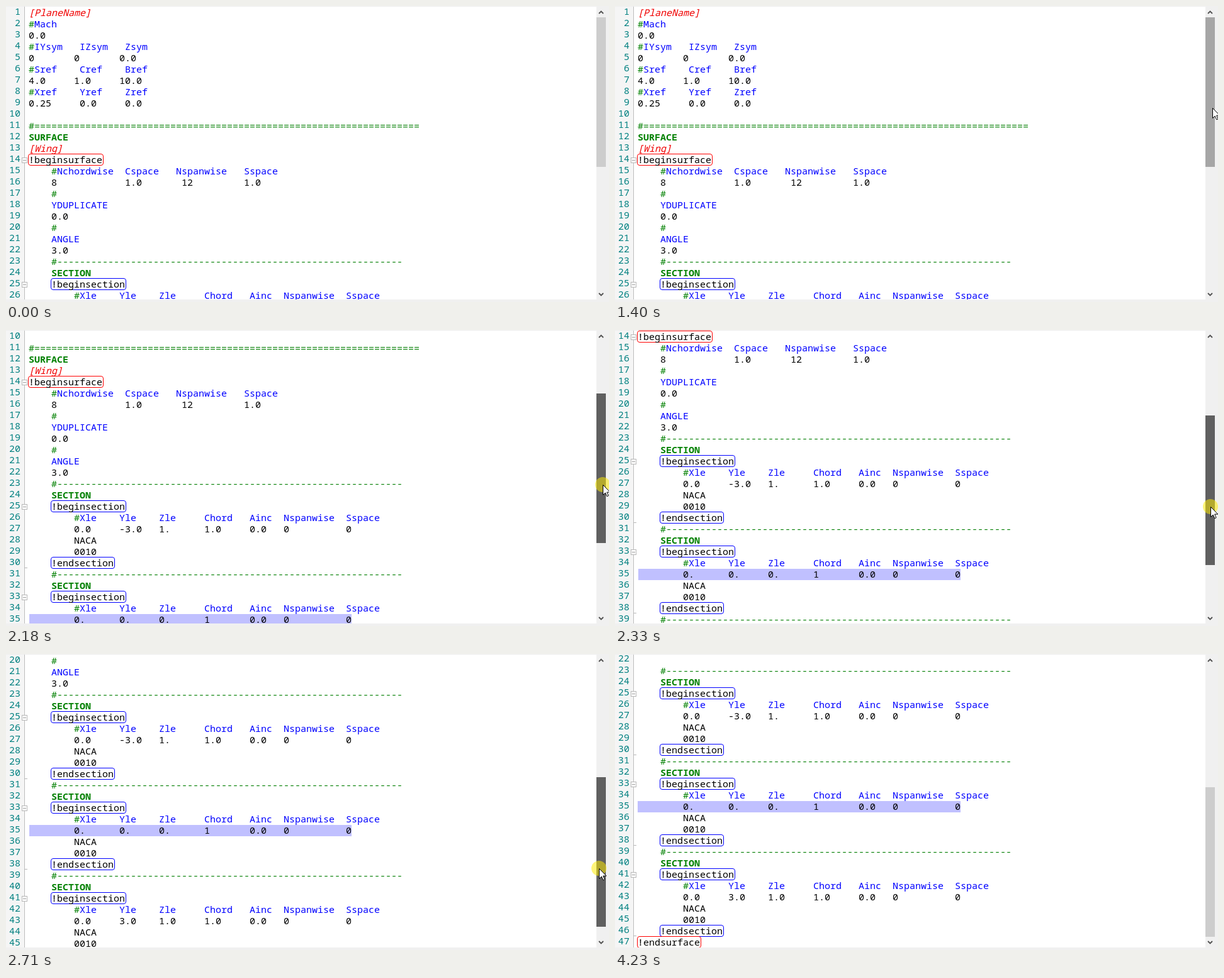
An HTML page with a canvas for the animation above (4.3 s loop, 958 by 471 pixels).

```html
<!DOCTYPE html>
<html lang="en">
<head>
<meta charset="utf-8">
<title>Scrolling through an input file</title>
<style>
html, body { margin: 0; width: 958px; height: 471px; overflow: hidden; background: #fff; }
canvas { display: block; }
</style>
</head>
<body>
<canvas id="stage" width="958" height="471"></canvas>
<script>
const ctx = document.getElementById('stage').getContext('2d');
const LOOP = 4300, ROW = 18, CHAR = 9, LEFT = 36, BOTTOM = 467;
const THUMB_TOP = 18, THUMB_H = 238, TRAVEL = 194, MAX_SCROLL = 380, GRAB = 145;
const FONT = '15px "Noto Sans Mono", "DejaVu Sans Mono", monospace';
const GREEN = '#008000', BLUE = '#0000ff', RED = '#f00000';

const section = values => [
  '    #' + '-'.repeat(61),
  '    SECTION',
  '    !beginsection',
  '        #Xle    Yle    Zle     Chord   Ainc  Nspanwise  Sspace',
  '        ' + values,
  '        NACA',
  '        0010',
  '    !endsection'
];

const lines = [
  '[PlaneName]',
  '#Mach',
  '0.0',
  '#IYsym   IZsym   Zsym',
  '0       0       0.0',
  '#Sref    Cref    Bref',
  '4.0     1.0     10.0',
  '#Xref    Yref    Zref',
  '0.25     0.0     0.0',
  '',
  '#' + '='.repeat(67),
  'SURFACE',
  '[Wing]',
  '!beginsurface',
  '    #Nchordwise  Cspace   Nspanwise   Sspace',
  '    8            1.0       12         1.0',
  '    #',
  '    YDUPLICATE',
  '    0.0',
  '    #',
  '    ANGLE',
  '    3.0',
  ...section('0.0     -3.0   1.      1.0     0.0   0          0'),
  ...section('0.      0.     0.      1       0.0   0          0'),
  ...section('0.0     3.0    1.0     1.0     0.0   0          0'),
  '!endsurface'
];
lines[10] += '=';
const SELECTED = 34;

// Screen updates come in bursts: first time, last time, count
const bursts = [
  [550, 990, 7], [1080, 1400, 5], [1730, 2180, 7],
  [2260, 2710, 7], [2790, 3280, 7], [3350, 3520, 3]
];
// Pointer path: time, x, y
const path = [
  [550, 896, 441], [990, 913, 167], [1400, 949, 162], [1730, 949, 163],
  [1955, 951, 196], [2335, 946, 281], [2560, 942, 319], [3117, 943, 400],
  [3198, 943, 403], [3280, 943, 425], [3435, 944, 455], [3520, 944, 471]
];

function lastUpdate(t) {
  let last = 0;
  for (const [from, to, n] of bursts) {
    const step = (to - from) / (n - 1);
    if (t + 8 >= from) last = from + step * Math.min(n - 1, Math.floor((t + 8 - from) / step));
  }
  return last;
}

function pointerAt(t) {
  const i = path.findIndex(p => p[0] >= t);
  if (i <= 0) return { x: path[0][1], y: path[0][2] };
  const [t0, x0, y0] = path[i - 1], [t1, x1, y1] = path[i];
  const k = (t - t0) / (t1 - t0);
  return { x: Math.round(x0 + (x1 - x0) * k), y: Math.round(y0 + (y1 - y0) * k) };
}

function rect(color, x, y, w, h) {
  ctx.fillStyle = color;
  ctx.fillRect(x, y, w, h);
}

function text(str, x, y, color, style = '') {
  ctx.font = style + ' ' + FONT;
  ctx.fillStyle = color;
  ctx.fillText(str, x, y);
}

function polyline(points, color, width) {
  ctx.beginPath();
  points.forEach(([x, y]) => ctx.lineTo(x, y));
  ctx.strokeStyle = color;
  ctx.lineWidth = width;
  ctx.stroke();
}

function drawCode(line, y) {
  const word = line.trim(), x = LEFT + CHAR * line.search(/\S|$/);
  if (word[0] === '#') {
    const rule = /^#[-=]/.test(word);
    text('#', x, y, GREEN);
    text(word.slice(1), x + CHAR, y, rule ? GREEN : BLUE);
  } else if (word[0] === '[') {
    text(word, x, y, RED, 'italic');
  } else if (word === 'SURFACE' || word === 'SECTION') {
    text(word, x, y, GREEN, 'bold');
  } else if (word[0] === '!') {
    ctx.beginPath();
    ctx.roundRect(x - 0.5, y - 14.5, word.length * CHAR + 2, ROW, 3.5);
    ctx.strokeStyle = word.endsWith('surface') ? '#ff0000' : BLUE;
    ctx.lineWidth = 1;
    ctx.stroke();
    text(word, x, y, '#000');
  } else {
    text(word, x, y, /^(YDUP|ANGLE)/.test(word) ? BLUE : '#000');
  }
}

function drawFold(line, y) {
  if (line.includes('!begin')) {
    rect('#fff', 25, y - 9, 9, 9);
    ctx.strokeStyle = '#b8b8b8';
    ctx.lineWidth = 1;
    ctx.strokeRect(25.5, y - 8.5, 8, 8);
    rect('#a0a0a0', 27, y - 5, 5, 1);
  } else if (line.includes('!endsection')) {
    rect('#b8b8b8', 29, y + 2, 5, 1);
  }
}

function drawEditor(scroll, caretOn) {
  rect('#fff', 0, 0, 958, 471);
  rect('#f5f5f5', 0, 0, 29, BOTTOM);
  rect('#bcbcbc', 29, 0, 1, BOTTOM);
  lines.forEach((line, i) => {
    const y = 16 + ROW * i - scroll;
    if (y < -ROW || y > BOTTOM + ROW) return;
    ctx.textAlign = 'right';
    text(i + 1, 23, y - 2, '#008080');
    ctx.textAlign = 'left';
    // A row cut by the top edge keeps only its number
    if (y < 15) return;
    if (i === SELECTED) {
      const x = caretOn ? LEFT + 1 : LEFT;
      rect('#c0c0ff', x, y - 14, LEFT + line.length * CHAR - x, ROW);
    }
    drawFold(line, y);
    drawCode(line, y);
  });
  rect('#f0f0f0', 0, BOTTOM, 958, 4);
  rect('#eeeeee', 0, 0, 958, 1);
}

function drawScrollbar(thumb, color) {
  rect('#f0f0f0', 938, 0, 20, 471);
  rect(color, 938, THUMB_TOP + thumb, 15, THUMB_H);
  polyline([[942, 12], [945.5, 8.5], [949, 12]], '#505050', 1.8);
  polyline([[942, 457], [945.5, 460.5], [949, 457]], '#505050', 1.8);
}

function drawPointer({ x, y }, pressed) {
  if (pressed) {
    ctx.beginPath();
    ctx.arc(x, y, 12, 0, 7);
    ctx.fillStyle = 'rgba(255, 234, 0, 0.53)';
    ctx.fill();
  }
  const shape = [[0, 0], [0, 16], [3.7, 12.6], [6.3, 18.3], [8.7, 17.2], [6.2, 11.6], [11.3, 11.6]];
  ctx.beginPath();
  shape.forEach(([dx, dy]) => ctx.lineTo(x + 0.5 + dx, y + 0.5 + dy));
  ctx.closePath();
  ctx.fillStyle = '#fff';
  ctx.fill();
  ctx.strokeStyle = '#000';
  ctx.lineWidth = 1;
  ctx.stroke();
}

function draw(now) {
  const t = now % LOOP, u = lastUpdate(t);
  const pointer = pointerAt(u);
  const visible = u >= 550 && u < 3520, pressed = u >= 1730 && u < 3279;
  const thumb = u < 1730 ? 0 : u > 3110 ? TRAVEL
    : Math.max(0, Math.min(TRAVEL, pointer.y - GRAB - THUMB_TOP));
  const scroll = thumb === TRAVEL ? MAX_SCROLL
    : ROW * Math.round(thumb / TRAVEL * MAX_SCROLL / ROW);
  const hover = visible && pointer.x >= 938 && pointer.y < THUMB_TOP + thumb + THUMB_H;
  const caretOn = t < 3830 || (t >= 3910 && t < 4060);

  drawEditor(scroll, caretOn);
  drawScrollbar(thumb, pressed ? '#606060' : hover ? '#a6a6a6' : '#cdcdcd');
  if (visible) drawPointer(pointer, pressed);
}

const start = performance.now();
function tick() {
  draw(performance.now() - start);
  requestAnimationFrame(tick);
}
tick();
</script>
</body>
</html>
```
